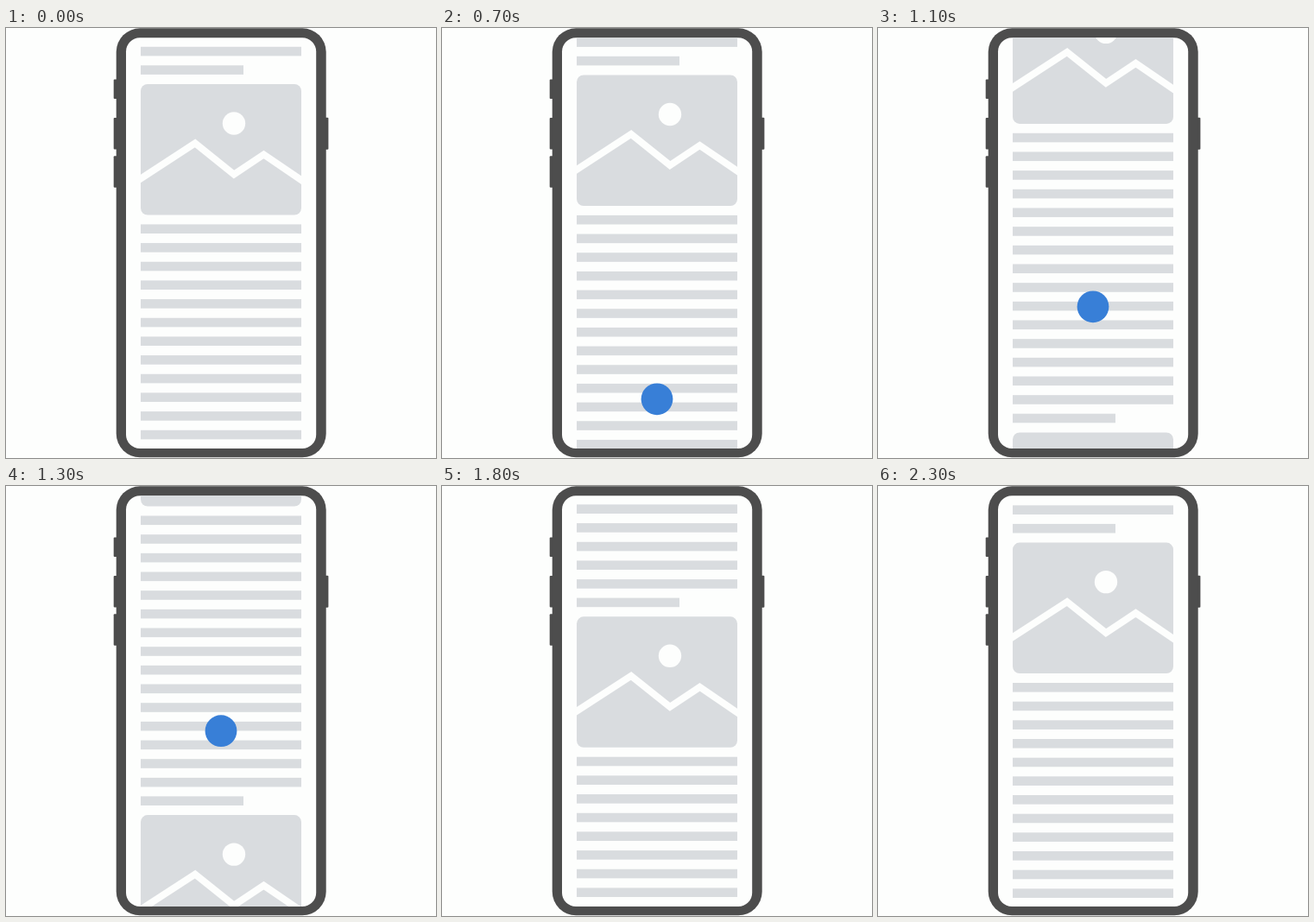
Write an HTML page with a canvas that moves like this. It is 498 px wide and 498 px high and loops after 2350 ms.

```html
<!DOCTYPE html>
<html lang="en">
<head>
<meta charset="utf-8">
<title>Scrolling phone</title>
<style>
html, body { margin: 0; width: 100%; height: 100%; overflow: hidden; background: #fdfefd; }
canvas { display: block; width: 498px; height: 498px; }
</style>
</head>
<body>
<canvas id="stage" width="498" height="498"></canvas>
<script>
const ctx = document.getElementById('stage').getContext('2d');
const LOOP = 2350, STEP = 50, HOLD = 200;
const PAPER = '#fdfefd', GREY = '#d9dcdf', FRAME = '#4d4d4d', BLUE = '#387fd7';
const LEFT = 156, WIDTH = 186, SHORT = 119, BAR = 10.6, PITCH = 21.67;
const PERIOD = 509;      // height of one repeating article block
const LINES = 15;        // full lines between picture and short line

const clamp = v => Math.min(1, Math.max(0, v));
const span = (t, from, to) => clamp((t - from) / (to - from));

// Symmetric cubic-bezier(a, 0, 1 - a, 1)
function ease(x, a = 0.46) {
  let lo = 0, hi = 1;
  for (let i = 0; i < 24; i++) {
    const u = (lo + hi) / 2;
    const at = u * (3 * a + u * (3 - 9 * a + u * (6 * a - 2)));
    if (at < x) lo = u; else hi = u;
  }
  return lo * lo * (3 - 2 * lo);
}

function roundRect(x, y, w, h, r) {
  ctx.beginPath();
  ctx.roundRect(x, y, w, h, r);
}

function disc(x, y, r, color) {
  ctx.fillStyle = color;
  ctx.beginPath();
  ctx.arc(x, y, r, 0, Math.PI * 2);
  ctx.fill();
}

function bar(y, w) {
  ctx.fillStyle = GREY;
  ctx.fillRect(LEFT, y, w, BAR);
}

function picture(y) {
  ctx.save();
  roundRect(LEFT, y, WIDTH, 151.5, 8);
  ctx.fillStyle = GREY;
  ctx.fill();
  ctx.clip();
  disc(264, y + 45.5, 13.2, PAPER);
  ctx.beginPath();
  for (const [px, py] of [[146, 116], [219, 68.5], [264, 104.5], [298.5, 81.5], [352, 118]]) {
    ctx.lineTo(px, y + py);
  }
  ctx.strokeStyle = PAPER;
  ctx.lineWidth = 8;
  ctx.lineJoin = 'miter';
  ctx.stroke();
  ctx.restore();
}

function block(top) {
  bar(top + 43.3, SHORT);
  picture(top + 65);
  for (let i = 0; i < LINES; i++) bar(top + 227.4 + i * PITCH, WIDTH);
}

function phone() {
  ctx.fillStyle = FRAME;
  for (const [x, y, h] of [[124.7, 59.5, 22.5], [124.7, 104, 36.5], [124.7, 148.3, 36.5], [367.4, 103.7, 37]]) {
    roundRect(x, y, 6, h, 1);
    ctx.fill();
  }
  roundRect(127.7, 0.3, 243, 497, 27.5);
  ctx.fill();
  roundRect(139, 11.2, 220.2, 475.8, 16);
  ctx.fillStyle = PAPER;
  ctx.fill();
}

function draw(t) {
  ctx.fillStyle = PAPER;
  ctx.fillRect(0, 0, 498, 498);
  phone();

  ctx.save();
  ctx.clip();
  const scroll = PERIOD * ease(span(t, 496, LOOP));
  for (let n = -1; n < 2; n++) block(n * PERIOD - scroll);

  // touch point
  ctx.globalAlpha = span(t, 200, 500) * (1 - span(t, 1430, 1700));
  disc(249, 443 - 168 * ease(span(t, 500, 1464)), 18.4, BLUE);
  ctx.restore();
}

let start;
function tick(now) {
  start ??= now;
  const t = Math.floor(((now - start) % LOOP) / STEP) * STEP;
  draw(t < HOLD ? 0 : t);
  requestAnimationFrame(tick);
}
draw(0);
requestAnimationFrame(tick);
</script>
</body>
</html>
```
